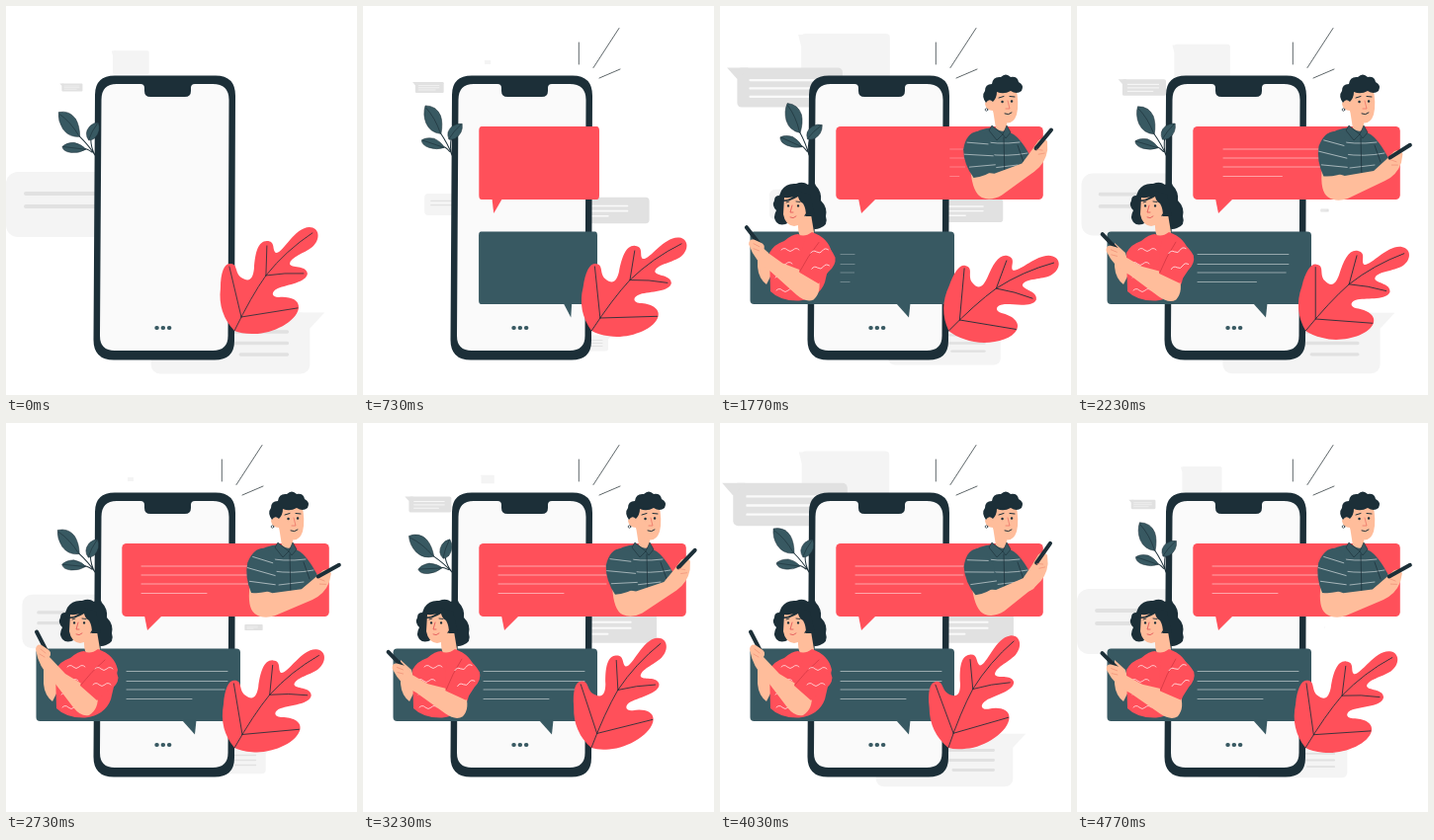
These frames come from a looping animation (355x394 px, 4810 ms). An HTML page:

```html
<!DOCTYPE html>
<html lang="en">
<head>
<meta charset="utf-8">
<title>Chat</title>
<style>
  html, body { margin: 0; width: 100%; height: 100%; overflow: hidden; background: #fff; }
  svg { display: block; width: 100vw; height: 100vh; }
  .grey { fill: #e1e1e1; }
  .pale { fill: #f4f4f4; }
  .dark { fill: #1c2f38; }
  .teal { fill: #385962; }
  .red { fill: #ff505a; }
  .skin { fill: #ffbd9b; }
  .line { fill: none; stroke-linecap: round; stroke-linejoin: round; }
  .ink { stroke: #1c2f38; }
  .white { stroke: #fff; }
  .text { stroke-width: .9; stroke-opacity: .55; }
</style>
</head>
<body>
<svg viewBox="0 0 355 394" xmlns="http://www.w3.org/2000/svg">
  <defs>
    <path id="squiggle" class="line white" stroke-width=".8" stroke-opacity=".85" d="M0 0q3-3 6 0t6 0t6 0"/>
  </defs>

  <!-- background chat bubbles, drawn around their own centres -->
  <g id="paleTop" class="pale">
    <rect x="-44" y="-29" width="90" height="58" rx="4"/>
    <path d="M-47-28H-36L-44-16Z"/>
  </g>
  <g id="greyTop">
    <rect class="grey" x="-52" y="-21.5" width="114" height="43" rx="5"/>
    <path class="grey" d="M-63-21.5H-40L-52-9Z"/>
    <path class="line" stroke="#fafafa" stroke-width="2.4" d="M-38-8H43M-38 1H43M-38 10H28"/>
  </g>
  <g id="paleLeft">
    <rect class="pale" x="-93" y="-33" width="186" height="66" rx="12"/>
    <path class="line" stroke="#e1e1e1" stroke-width="4" stroke-linecap="butt" d="M-73-11H40M-73 2H40"/>
  </g>
  <g id="greyRight">
    <rect class="grey" x="-62" y="-21" width="124" height="42" rx="6"/>
    <path class="line" stroke="#fafafa" stroke-width="2.4" d="M-45-7H27M-45 1H27M-45 9H-4"/>
  </g>
  <g id="paleBottom">
    <rect class="pale" x="-70" y="-27" width="140" height="54" rx="8"/>
    <path class="pale" d="M60-27H83L70-13Z"/>
    <path class="line" stroke="#e1e1e1" stroke-width="3" d="M-20-10H50M-20 0H50M9 10H50"/>
  </g>

  <g id="rays" class="line" stroke="#4d565a" stroke-width=".9">
    <path pathLength="1" d="M218.3 59V37"/>
    <path pathLength="1" d="M233 62.5L259 22.5"/>
    <path pathLength="1" d="M239 73L260 64"/>
  </g>

  <!-- phone -->
  <path class="dark" d="M110 70.5H212Q232 70.5 232 91L231 339Q231 358.5 211 358.5H109Q88.5 358.5 88.5 338L90 90Q90 70.5 110 70.5Z"/>
  <path fill="#fafafa" d="M112 79H136Q140 79 140 83V86Q140 92 146 92H181Q187 92 187 86V83Q187 79 191 79H209Q225.5 79 225.5 95L224.5 334Q224.5 349 209 349H110Q95 349 95 334L96.500 95Q96.500 79 112 79Z"/>
  <path class="line" stroke="#385962" stroke-width="4" stroke-dasharray=".5 5.8" d="M152.3 326H166"/>

  <g id="plant">
    <path class="line ink" d="M90 151Q84 141 74 131M90 151Q86 144 86 134M87 148Q82 144 78 144"/>
    <g class="teal ink" stroke-width=".5">
      <path d="M54 107Q65 105 71 114Q75 121 75 132Q64 133 58 124Q53 116 54 107Z"/>
      <path d="M94 118Q97 127 90 134Q87 136 84 136Q79 129 85 122Q89 118 94 118Z"/>
      <path d="M57 142Q61 138 69 138Q77 140 81 145Q74 149 66 148Q58 147 57 142Z"/>
    </g>
    <path class="line ink" stroke-width=".6" d="M55 109Q66 117 74 131M93 119Q87 127 84 135M58 142L80 145"/>
  </g>

  <!-- messages -->
  <g id="redBubble" class="red">
    <rect x="117.300" y="122" width="209.500" height="74" rx="4.500"/>
    <path d="M140 195L143 210L158 195Z"/>
  </g>
  <path id="redText" class="line white text" d="M137 145H246M137 154H246M137 163H246M137 172.500H203"/>
  <g id="tealBubble" class="teal">
    <rect x="30.500" y="228.500" width="206.500" height="73.500" rx="4"/>
    <path d="M178 301L191 315.500L192.500 301Z"/>
  </g>
  <path id="tealText" class="line white text" d="M122 251.500H224M122 261.500H224M122 270H221M122 279.500H188"/>

  <g id="man">
    <path class="skin" d="M302 158L315 153L322 160Q319 170 309 171Z"/>
    <path class="teal" d="M252 132Q262 124 276 123L295 129Q305 134 317 158L309 168L300 178L268 190Q252 170 252 132Z"/>
    <path class="line white" stroke-width=".7" stroke-opacity=".75" d="M260 136Q280 141 303 138M270 150Q290 153 311 149M276 164L301 161"/>
    <path class="line ink" stroke-width=".7" d="M287 133L288 177M301 141L307 158"/>
    <path class="skin" d="M276 105L290 113V123Q287 130 279 124Z"/>
    <path class="teal ink" stroke-width=".6" d="M275 121L286 130L280 136L272 126ZM290 121L294 128L289 134L286 130Z"/>
    <path class="skin" d="M276 87L299 82Q303 98 300 110Q297 119 290 118.500Q280 117 276 106Q269 106 268 99Q270 93 275 96Z"/>
    <path class="dark" d="M269 98Q264 91 268 86Q268 79 275 79Q276 71 284 72Q289 67 294 72Q301 71 302 77Q308 80 305 86Q300 90 294 86Q287 90 280 87Q280 93 276 97Q272 93 269 98Z"/>
    <circle class="line ink" cx="269.500" cy="105" r="1.300" stroke-width=".7"/>
    <path class="line ink" stroke-width="2.400" d="M285.500 97h.1M295 96.500h.1"/>
    <path class="line ink" d="M282 93L287 91.500M293 91.500L298 92M288 109Q292 111 295 108"/>
    <path class="line" stroke="#ed7468" stroke-width=".8" d="M291 96L293 104H289"/>
    <g id="manArm">
      <path class="skin" d="M253 167Q255 190 264 194Q273 198 284 192L318 168Q329 160 331 147V138Q327 133 322 137L315 147L305 160L277 170Z"/>
      <path class="teal" d="M261 127Q249 128 246 145Q246 160 256 174Q268 173 279 165Q278 143 269 130Z"/>
      <path class="line white" stroke-width=".7" stroke-opacity=".75" d="M250 138L271 140M247 150L276 152M252 163L278 161"/>
      <path id="manPhone" class="line ink" stroke-width="4" d="M319.500 145L335 126.500"/>
      <path class="line" stroke="#ed8a72" stroke-width=".6" d="M320 146L326 147M322 151L328 150"/>
    </g>
  </g>

  <g id="woman">
    <path class="skin" d="M38 240L49 250L54 268L47 282Q39 276 38 264Z"/>
    <path class="dark" d="M62 187Q67 179 77 180Q84 177 89 181Q95 176 97 182Q103 188 102 197Q109 204 107 213Q110 222 101 225Q93 228 88 221L70 219Q62 224 57 219Q53 214 57 207Q52 202 55 197Q55 192 60 192Z"/>
    <path class="skin" d="M79 215L92 211L95 229Q92 237 84 236Q78 234 79 215Z"/>
    <path class="red" d="M65 238Q73 231 79 231Q85 235 93 229Q110 235 113 250L106 280Q100 296 80 298.500Q61 299 51 289L50 250Q55 241 65 238Z"/>
    <use href="#squiggle" x="62" y="247"/>
    <use href="#squiggle" x="55" y="261"/>
    <use href="#squiggle" x="56" y="275"/>
    <use href="#squiggle" x="57" y="288"/>
    <path class="skin" d="M65 194Q74 195 82 191L88 203Q90 209 86 211Q83 223 75 223Q66 222 64 211Z"/>
    <path class="dark" d="M60 196Q71 199 80 187L91 191L96 213L87 213Q87 205 84 200Q80 198 79 193Q71 198 64 198Z"/>
    <path class="line ink" stroke-width="2.300" d="M69 202.500h.1M79 202.500h.1"/>
    <path class="line ink" stroke-width=".9" d="M67 199L70 198M77 198L81 198.500"/>
    <path class="line" stroke="#e55b5b" stroke-width=".9" d="M73 202L71 209H74M71 214Q74 216 77 213"/>
    <g id="womanArm">
      <path class="line ink" stroke-width="4" d="M31 211.500L40.500 230"/>
      <path class="skin" d="M44 237L60 254L93 274Q94 290 84 296Q76 298 68 288L46 259Q33 248 30 229Q31 223 36 225L42 229Q47 232 44 237Z"/>
      <path class="red" d="M88 233Q108 235 113.500 258Q113 266 104 271L92 281L75 266Q80 245 88 233Z"/>
      <path class="line" stroke="#c9323e" stroke-width=".6" d="M100 240Q86 252 76 265"/>
      <use href="#squiggle" x="90" y="249"/>
      <use href="#squiggle" x="88" y="265"/>
      <path class="line" stroke="#ed8a72" stroke-width=".6" d="M35 229L40 233M34 234L39 237"/>
    </g>
  </g>

  <g id="leaf">
    <path class="red" d="M231 329Q214 311 217 286C217 270 221 261 226 261C235 260 231 270 238 275C247 281 250 275 251 266C252 250 255 238 264 238C273 238 269 247 273 250C280 251 292 224 307 224C317 224 319 236 310 244C301 251 288 254 287 261C288 266 304 262 305 271C304 280 285 282 275 286C268 289 268 295 276 295C286 294 297 297 296 306C294 320 268 333 249 332Q238 332 231 329Z"/>
    <path class="line ink" stroke-width=".8" d="M231 329Q248 294 263 273Q283 248 310 230M238 315L226 264M238 315L295 306M263 273L264 243M263 273Q282 270 301 271"/>
  </g>
</svg>
<script>
const LOOP = 4810, PULSE = 2400;
const $ = id => document.getElementById(id);
const mix = (a, b, k) => a + (b - a) * k;
const ease = k => (1 - Math.cos(Math.PI * Math.min(1, Math.max(0, k)))) / 2;
const ramp = (t, from, to) => ease((t - from) / (to - from));

// Swells from 0 to 1 and back; it is 1 at the peak time.
const wave = (t, peak, period = PULSE) => (1 + Math.cos(2 * Math.PI * (t - peak) / period)) / 2;

// Sways from rest to high, over to low and back, easing at each turn.
function sway(t, start, period, rest, high, low) {
  const p = ((t - start) / period + 1) % 1;
  if (p < .25) return mix(rest, high, ease(p * 4));
  if (p < .75) return mix(high, low, ease(p * 2 - .5));
  return mix(low, rest, ease(p * 4 - 3));
}

function scale(id, x, y, sx, sy = sx) {
  $(id).style.visibility = sx > .001 ? 'visible' : 'hidden';
  $(id).setAttribute('transform', `translate(${x} ${y}) scale(${sx} ${sy}) translate(${-x} ${-y})`);
}

function pulse(id, x, y, s) {
  $(id).setAttribute('transform', `translate(${x} ${y}) scale(${s})`);
}

function turn(id, x, y, angle) {
  $(id).setAttribute('transform', `rotate(${angle} ${x} ${y})`);
}

function draw(t) {
  pulse('paleTop', 126, 57, wave(t, 1730));
  pulse('greyTop', 66, 82.5, 1.03 * wave(t, 1535));
  pulse('paleLeft', 93, 201, wave(t, 0));
  pulse('greyRight', 250.5, 207, wave(t, 1230));
  pulse('paleBottom', 227, 341.5, 1.15 * wave(t, 2160, 2130));

  turn('plant', 90, 151, sway(t, 500, 4000, 10, 18, -12));
  turn('leaf', 231, 330, sway(t, 470, 4400, 5.5, 19, -9));

  const lift = wave(t, 3750);
  turn('manArm', 262, 135, mix(13, -6, lift));
  turn('manPhone', 326, 140, mix(10, -3, lift));
  turn('womanArm', 97, 240, mix(-19, 0, wave(t, 2720, 1300)));

  const grow = ramp(t, 400, 1000), write = ramp(t, 1570, 2400);
  scale('redBubble', 117.3, 0, grow, 1);
  scale('tealBubble', 237, 0, grow, 1);
  scale('redText', 248, 0, write, 1);
  scale('tealText', 122, 0, write, 1);

  const ray = ramp(t, 60, 450);
  $('rays').style.visibility = ray > 0 ? 'visible' : 'hidden';
  $('rays').style.strokeDasharray = `${ray} 2`;
  $('man').style.opacity = $('woman').style.opacity = ramp(t, 950, 1400);
}

function tick() {
  draw(performance.now() % LOOP);
  requestAnimationFrame(tick);
}
tick();
</script>
</body>
</html>
```
